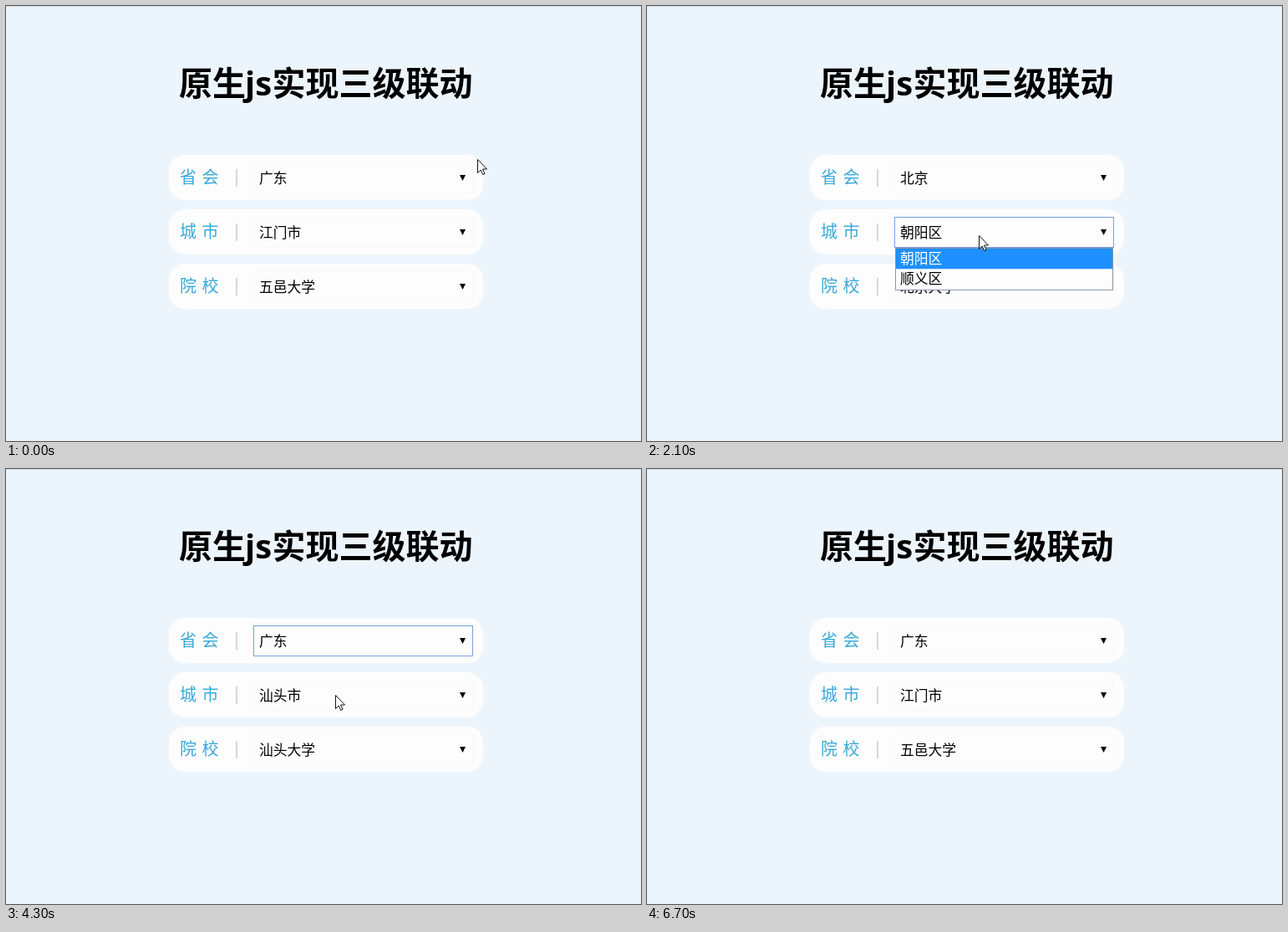
Animation, 760 px wide and 520 px high, one loop 7 s. Source, as an HTML page:

```html
<!DOCTYPE html>
<html lang="zh-CN">
<head>
<meta charset="utf-8">
<title>原生js实现三级联动</title>
<style>
  html, body { margin: 0; width: 100%; height: 100%; overflow: hidden; background: #edf5fc; }
  svg { display: block; }
  text { font: 350 16.8px "Noto Sans CJK SC", "Noto Sans CJK", sans-serif; white-space: pre; }
  .title { font-size: 40px; font-weight: 700; }
  .latin { font-family: "Open Sans", sans-serif; }
  .label { font-size: 20px; fill: #38a9d8; }
</style>
</head>
<body>
<svg width="760" height="520" viewBox="0 0 760 520">
  <rect width="760" height="1" fill="#d3dbe2"/>
  <text class="title" x="207" y="107">原生</text>
  <text class="title latin" x="286" y="107">js</text>
  <text class="title" x="318.5" y="107">实现三级联动</text>
  <g id="form"></g>
  <path id="cursor" d="M.5 .5V16.5L4.2 13L6.7 18.5L9 17.5L6.5 12H11.5Z" fill="#fff" stroke="#111"/>
</svg>
<script>
const LOOP = 7000, STEP = 100, PITCH = 65, ITEM = 24.3;
const SELECT_TOP = 187, LIST_TOP = 224;
const labels = ['省会', '城市', '院校'];
const schools = {
  北京: { 朝阳区: '北京大学', 顺义区: '' },
  重庆: {},
  广东: { 汕头市: '汕头大学', 江门市: '五邑大学' }
};

// Pointer legs: when it leaves, when it arrives, where, and the clicks made there.
const home = { x: 564, y: 183 };
const legs = [
  { leave: 0, arrive: 400, x: 431, y: 212, clicks: [600] },
  { leave: 700, arrive: 1100, x: 421, y: 240, clicks: [1300] },
  { leave: 1400, arrive: 1900, x: 397, y: 274, clicks: [1900, 2300] },
  { leave: 2300, arrive: 2800, x: 426, y: 195, clicks: [2800] },
  { leave: 2900, arrive: 3700, x: 400, y: 285, clicks: [3800] },
  { leave: 3800, arrive: 4300, x: 394, y: 270, clicks: [4700] },
  { leave: 4700, arrive: 5100, x: 362, y: 322, clicks: [5300] },
  { leave: 5300, arrive: 5900, x: 440, y: 394, clicks: [6100] },
  { leave: 6100, arrive: 6700, x: 705, y: 458, clicks: [] }
];
const clicks = legs.flatMap(leg => leg.clicks);
const vanish = legs[legs.length - 1].arrive;

function pointerAt(t) {
  let { x, y } = home;
  for (const leg of legs) {
    const k = Math.min(1, Math.max(0, (t - leg.leave) / (leg.arrive - leg.leave)));
    const eased = k * k * (3 - 2 * k);
    x += (leg.x - x) * eased;
    y += (leg.y - y) * eased;
  }
  return { x: Math.round(x), y: Math.round(y) };
}

const optionsOf = ({ province, city }, row) =>
  row === 0 ? Object.keys(schools) :
  row === 1 ? Object.keys(schools[province]) : [schools[province][city]];
const valuesOf = s => [s.province, s.city, schools[s.province][s.city]];

function itemUnder(s, y) {
  if (s.open < 0) return -1;
  const i = Math.floor((y - LIST_TOP - 1 - s.open * PITCH) / ITEM);
  return i < optionsOf(s, s.open).length ? i : -1;
}

function click(s, y) {
  const item = itemUnder(s, y);
  if (item >= 0) {
    const picked = optionsOf(s, s.open)[item];
    if (s.open === 0) {
      s.province = picked;
      s.city = optionsOf(s, 1)[0];
    } else {
      s.city = picked;
    }
    s.open = -1;
    return;
  }
  const row = labels.findIndex((_, i) => y >= SELECT_TOP + i * PITCH && y < LIST_TOP + i * PITCH);
  s.focus = row;
  s.open = row === s.open ? -1 : row;
  if (s.open >= 0) s.hover = optionsOf(s, row).indexOf(valuesOf(s)[row]);
}

// Replays the pointer from the start of the loop; hover lags one step behind it.
function stateAt(time) {
  const s = { province: '广东', city: '江门市', focus: -1, open: -1, hover: 0 };
  for (let t = 0; t <= time; t += STEP) {
    const item = itemUnder(s, pointerAt(t - STEP).y);
    if (item >= 0) s.hover = item;
    if (clicks.includes(t)) click(s, pointerAt(t).y);
  }
  return s;
}

const rect = (x, y, w, h, attrs) => `<rect x="${x}" y="${y}" width="${w}" height="${h}" ${attrs}/>`;
const text = (x, y, content, attrs = '') => `<text x="${x}" y="${y}" ${attrs}>${content}</text>`;

function drawRow(i, value, focused) {
  const y = i * PITCH, [first, second] = labels[i];
  return rect(195, 178 + y, 376, 54, 'rx="19" fill="#fdfdfd"')
    + text(208, 212 + y, first, 'class="label"')
    + text(234.5, 212 + y, second, 'class="label"')
    + rect(275, 195 + y, 2, 21, 'fill="#d8d8d8"')
    + rect(296.5, SELECT_TOP + .5 + y, 262, 36, `fill="#fdfdfd" stroke="${focused ? '#7a9fe0' : '#f6f8fa'}"`)
    + text(303, 212 + y, value)
    + `<path d="M543 ${202 + y}h7l-3.5 7z"/>`;
}

function drawList(s) {
  if (s.open < 0) return '';
  const items = optionsOf(s, s.open), top = LIST_TOP + s.open * PITCH;
  return rect(297.5, top + .5, 260, items.length * ITEM + 1.3, 'fill="#fdfdfd" stroke="#8795a5"')
    + items.map((item, i) => {
      const y = top + 1 + i * ITEM, active = i === s.hover;
      return (active ? rect(298, y, 259, ITEM, 'fill="#1e90ff"') : '')
        + text(303, y + 18, item, active ? 'fill="#fff"' : '');
    }).join('');
}

const form = document.getElementById('form'), cursor = document.getElementById('cursor');
const start = performance.now();
let shown = -1;

function render() {
  const t = Math.floor((performance.now() - start) % LOOP / STEP) * STEP;
  if (t !== shown) {
    shown = t;
    const s = stateAt(t), { x, y } = pointerAt(t);
    form.innerHTML = valuesOf(s).map((v, i) => drawRow(i, v, i === s.focus)).join('') + drawList(s);
    cursor.setAttribute('transform', `translate(${x} ${y})`);
    cursor.setAttribute('visibility', t < vanish ? 'visible' : 'hidden');
  }
  requestAnimationFrame(render);
}
render();
</script>
</body>
</html>
```
